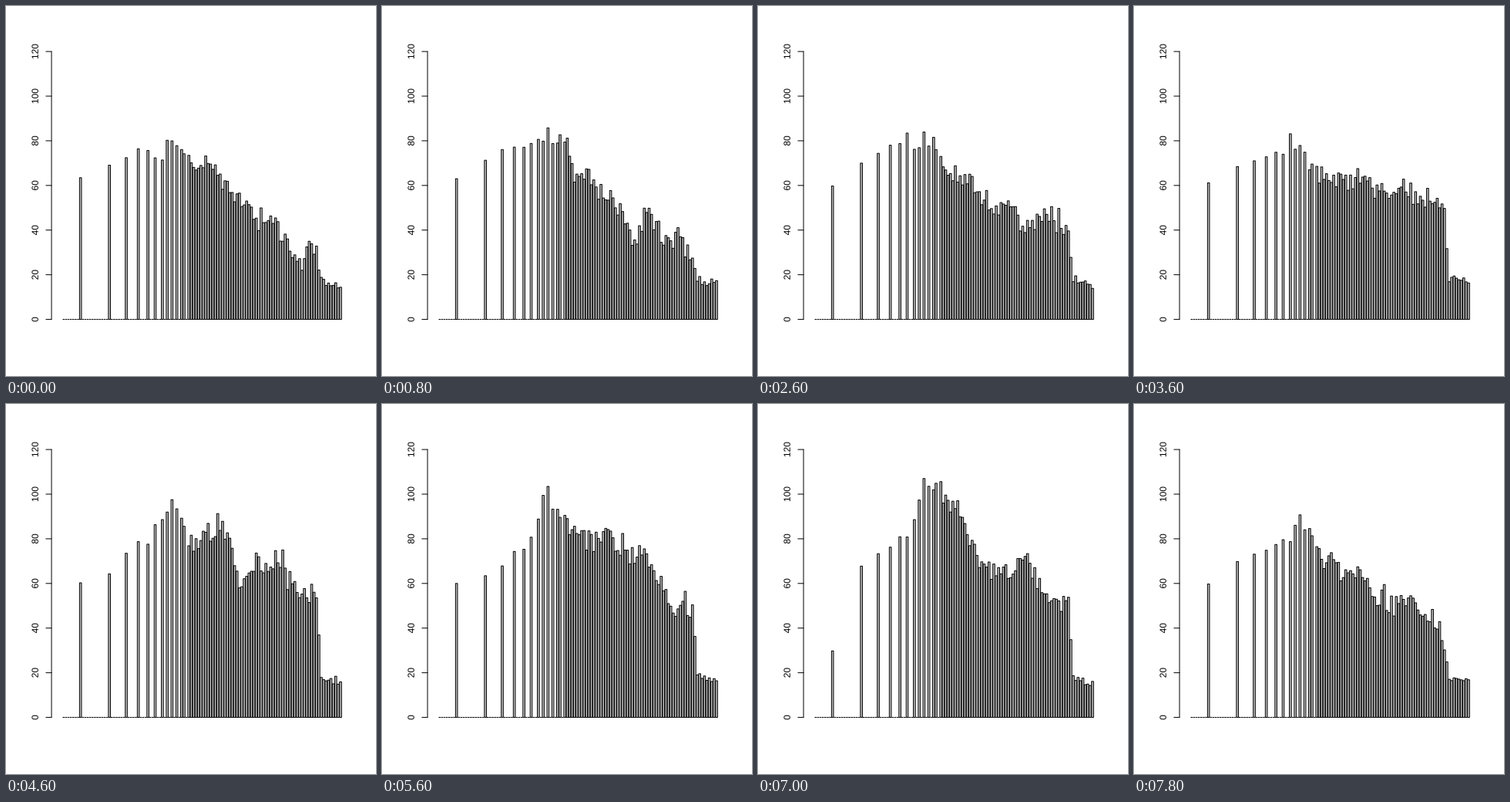
A matplotlib script that plays this animation: 480 px wide and 480 px high, repeating every 8 s.

```python
import numpy as np
import matplotlib.pyplot as plt
from matplotlib.animation import FuncAnimation
from matplotlib.collections import LineCollection, PolyCollection
from matplotlib.patches import PathPatch
from matplotlib.textpath import TextPath
from matplotlib.transforms import Affine2D

SIZE, DPI = 480, 72
FRAMES, INTERVAL = 40, 200
BARS = 116
FONT_SIZE = 12

# plot region in pixels; bars are 1 unit wide with a gap of 0.2
LEFT, BASE, TOP = 59.04, 406.56, 59.04
UNIT = 390.72 / (139 * 1.08)
X0 = LEFT + 0.04 * 139 * UNIT + 1.2 * UNIT * np.arange(BARS)
X1 = X0 + UNIT

# bands are spaced by pitch, so the lowest ones stand alone
FIRST_DENSE = 52
LONE = [7, 19, 26, 31, 35, 38, 41, 43, 45, 47, 49, 50]
ACTIVE = np.array(LONE + list(range(FIRST_DENSE, BARS)))
SILENT = np.setdiff1d(np.arange(FIRST_DENSE), LONE)

# loudness envelope: level at a few bands, for a few moments
BANDS = [45, 54, 64, 75, 88, 98, 105]
MOODS = {
    0: [79, 75, 60, 47, 46, 34, 28],
    8: [83, 73, 59, 47, 39, 34, 30],
    18: [81, 65, 63, 57, 57, 56, 49],
    23: [96, 77, 88, 62, 72, 58, 50],
    28: [101, 82, 80, 82, 70, 50, 49],
    35: [103, 98, 79, 65, 70, 50, 53],
    39: [90, 73, 67, 54, 57, 42, 37],
}
BASS = {7: 61, 19: 69, 26: 74, 38: 79}
HISS = {107: 17.8, 115: 16}


def levels(n):
    mood = [np.interp(n, list(MOODS), col) for col in zip(*MOODS.values())]
    knots = [*BASS, *BANDS, *HISS]
    h = np.interp(ACTIVE, knots, [*BASS.values(), *mood, *HISS.values()])

    # broad ripples plus a roughness that differs from bar to bar
    rng = np.random.default_rng(500 + n)
    ripple = np.convolve(rng.normal(0, 4, len(h) + 4), np.full(5, 0.3), "valid")
    rough = rng.normal(0, 2.6, len(h))
    spread = np.interp(ACTIVE, [7, 40, 105, 107], [0.4, 1, 1, 0.3])
    h += (ripple + rough) * spread

    # the lowest band falls silent for a moment
    h[0] *= min(1, abs(n - 34) / 2)
    return np.clip(h, 0, 107)


def y_of(value):
    return BASE - value * (BASE - TOP) / 120


def bar_verts(n):
    l, r, top = X0[ACTIVE], X1[ACTIVE], y_of(levels(n))
    base = np.full_like(top, BASE)
    return np.stack([np.column_stack(p) for p in
                     ((l, base), (l, top), (r, top), (r, base))], axis=1)


fig = plt.figure(figsize=(SIZE / DPI, SIZE / DPI), dpi=DPI, facecolor="white")
ax = fig.add_axes([0, 0, 1, 1])
ax.set(xlim=(0, SIZE), ylim=(SIZE, 0))
ax.axis("off")


def draw_lines(segments, cap):
    lines = LineCollection(segments, colors="black", linewidths=1, capstyle=cap)
    lines.set_snap(False)
    ax.add_collection(lines, autolim=False)


def draw_label(text, y):
    """Text reading upwards, centred on y."""
    path = TextPath((0, 0), text, size=FONT_SIZE,
                    prop={"family": "Liberation Sans"})
    width = 0.556 * FONT_SIZE * len(text)
    turn = Affine2D.from_values(0, -1, -1, 0, 41.76, y + width / 2)
    ax.add_patch(PathPatch(turn.transform_path(path), fc="black", lw=0,
                           snap=False))


axis = [[(LEFT, BASE), (LEFT, TOP)]]
for value in range(0, 121, 20):
    y = y_of(value)
    axis.append([(LEFT, y), (LEFT - 7.2, y)])
    draw_label(str(value), y)
draw_lines(axis, "round")

# silent bands leave only a dash on the baseline
draw_lines([[(X0[i], BASE), (X1[i], BASE)] for i in SILENT], "butt")

bars = PolyCollection(bar_verts(0), facecolors="#bebebe", edgecolors="black",
                      linewidths=1, joinstyle="round")
bars.set_snap(False)
ax.add_collection(bars, autolim=False)


def update(n):
    bars.set_verts(bar_verts(n))
    return [bars]


anim = FuncAnimation(fig, update, frames=FRAMES, interval=INTERVAL,
                     repeat=True, repeat_delay=0, blit=False)
plt.show()
```
